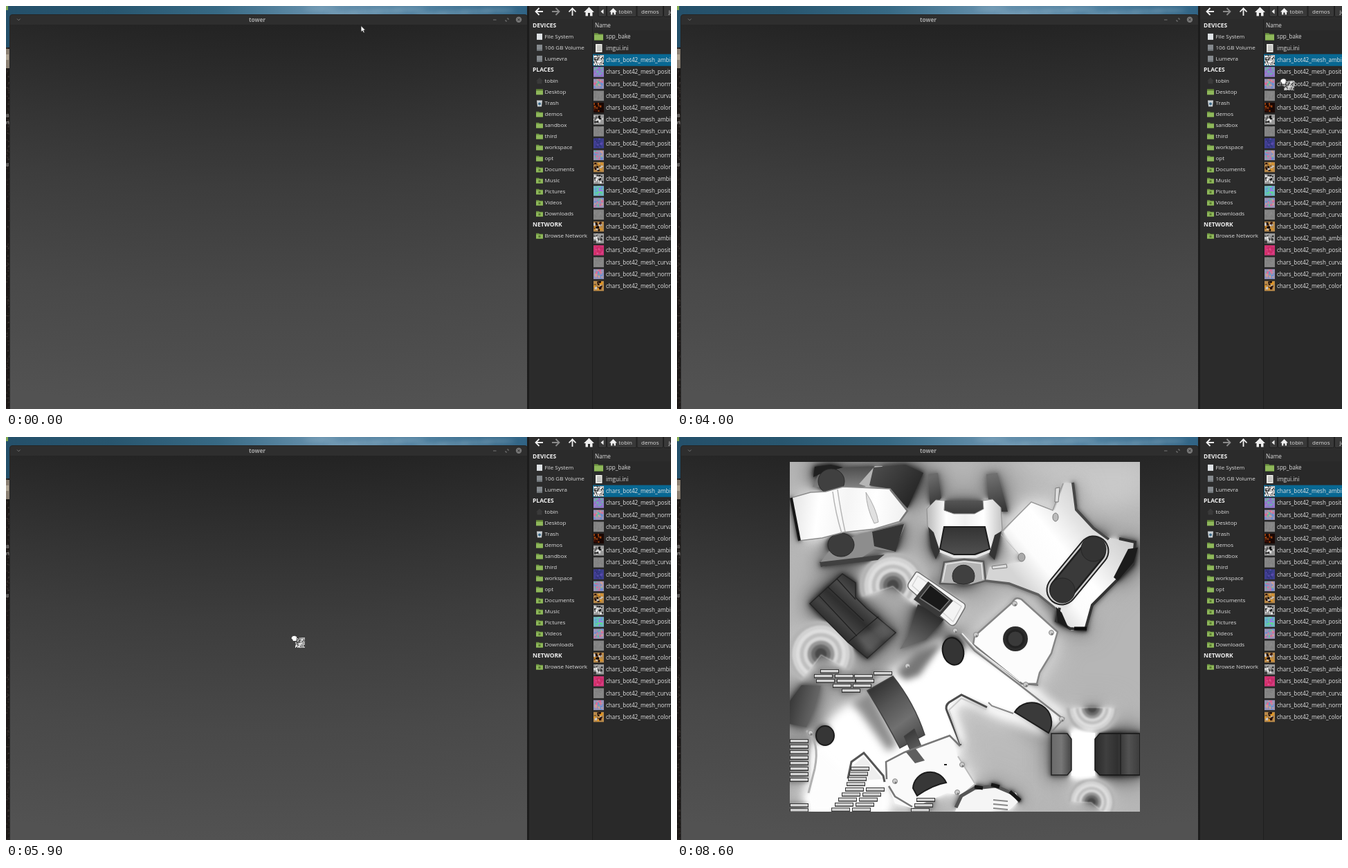
Recreate the animation shown at these times as an HTML page with a canvas. Size 961x583 px, loop 9000 ms.

```html
<!DOCTYPE html>
<html lang="en">
<head>
<meta charset="utf-8">
<title>tower</title>
<style>
html, body { margin: 0; width: 100%; height: 100%; overflow: hidden; background: #2b2b2b; }
canvas { display: block; }
</style>
</head>
<body>
<canvas id="stage" width="961" height="583"></canvas>
<script>
const W = 961, H = 583, LOOP = 9000;
const FONT = '"Open Sans", "Noto Sans", sans-serif';
const ctx = document.getElementById('stage').getContext('2d');

function layer(w, h) {
  const c = document.createElement('canvas');
  c.width = w;
  c.height = h;
  return c.getContext('2d');
}

function shape(g, d, fill, stroke, width = 1) {
  const p = new Path2D(d);
  if (fill) { g.fillStyle = fill; g.fill(p); }
  if (stroke) { g.strokeStyle = stroke; g.lineWidth = width; g.stroke(p); }
}

function box(g, x, y, w, h, fill) {
  g.fillStyle = fill;
  g.fillRect(x, y, w, h);
}

function oval(g, x, y, rx, ry, fill, stroke, width = 1, turn = 0) {
  g.beginPath();
  g.ellipse(x, y, rx, ry, turn, 0, 7);
  if (fill) { g.fillStyle = fill; g.fill(); }
  if (stroke) { g.strokeStyle = stroke; g.lineWidth = width; g.stroke(); }
}

function linear(g, x0, y0, x1, y1, ...colors) {
  const grad = g.createLinearGradient(x0, y0, x1, y1);
  colors.forEach((c, i) => grad.addColorStop(i / (colors.length - 1), c));
  return grad;
}

function text(g, s, x, y, size = 8, color = '#dedede', weight = 400) {
  g.font = `${weight} ${size}px ${FONT}`;
  g.fillStyle = color;
  g.fillText(s, x, y + 2.9);
}

function random(seed) {
  return () => {
    seed = (seed * 16807 + 11) % 2147483647;
    return seed / 2147483647;
  };
}

function softShape(g, blur, d, fill) {
  g.filter = `blur(${blur}px)`;
  shape(g, d, fill);
  g.filter = 'none';
}

// Islands of the baked map, in stage coordinates
function drawIslands() {
  const g = layer(506, 506);
  g.translate(-163, -36);
  const put = (d, fill, stroke, w) => shape(g, d, fill, stroke, w);
  const soft = (blur, d, fill) => softShape(g, blur, d, fill);

  // Turned discs
  const disc = (x, y, a, b, size = 1) => {
    g.filter = 'blur(1.3px)';
    ['#b4b4b4', '#d2d2d2', '#dedede', '#c0c0c0', '#d8d8d8', '#979797', '#6a6a6a', '#484848'].forEach((c, i) => {
      g.beginPath();
      g.arc(x, y, (47 - i * 5.5) * size, a, b);
      g.lineTo(x, y);
      g.fillStyle = c;
      g.fill();
    });
    g.filter = 'none';
  };
  disc(312, 215, 2.8, 7);
  disc(208, 314, 2.2, 6.8);

  // Main body
  soft(9, 'M245 400L300 350 385 300 445 325 500 358 560 405 530 425 450 390 410 374 390 392 410 445 310 480 300 545H190L205 430Z', '#fff');
  soft(7, 'M350 340L385 300 440 325 505 362 490 385 410 375 390 390 405 440 350 430Z', '#fff');
  soft(5, 'M200 445L245 490 270 460 300 500V542H190Z', '#fdfdfd');
  soft(5, 'M318 340L348 312 385 296 350 345 330 352Z', '#777');
  soft(6, 'M255 385L280 365 318 445 305 455Z', '#8c8c8c');

  // Hull
  put('M196 72L205 52 240 44 290 42 272 72 245 76Z', linear(g, 0, 42, 0, 76, '#4c4c4c', '#858585'));
  put('M197 58L199 43 222 40 240 44 208 53Z', '#202020');
  oval(g, 223, 64, 19, 18, '#404040', '#2a2a2a');
  put('M263 68L286 42 297 42 278 73Z', '#b5b5b5');
  put('M284 44L330 40 356 52 333 103 308 75 278 70Z', linear(g, 285, 45, 345, 90, '#4b4b4b', '#252525'));
  put('M206 183L225 158 265 140 330 126 314 166 285 162 265 176 210 188Z', '#8d8d8d');
  put('M282 137L328 126 316 166 285 158Z', '#363636');
  oval(g, 237, 156, 19, 17, '#3c3c3c', '#262626');
  put('M206 181L300 170 290 178 208 188Z', '#404040');
  put('M165 88L193 80 215 79 240 72 308 75 333 106 322 122 285 133 240 138 210 146 177 150Z',
    linear(g, 165, 90, 325, 110, '#e4e4e4', '#fff', '#f5f5f5', '#fff', '#f2f2f2'), '#8a8a8a', 1.5);
  put('M165 88L177 150', null, '#161616', 4);
  put('M232 76Q236 105 243 137M225 79Q229 110 238 139', null, '#b5b5b5', 1.5);
  put('M273 80Q288 103 291 123L285 125Q274 103 273 80Z', '#e0e0e0', '#aaa');
  put('M308 76L333 107 322 122', null, '#777', 2.5);

  // Yoke
  put('M363 54L377 52 382 88 366 106Z', linear(g, 363, 60, 380, 95, '#6a6a6a', '#383838'));
  put('M447 54L463 52 478 108 466 108 450 90Z', linear(g, 455, 55, 470, 105, '#707070', '#383838'));
  put('M386 92H442L447 123H381Z', linear(g, 0, 92, 0, 123, '#555', '#2a2a2a'));
  put('M361 104L374 91 387 92 386 106 400 111H430L443 104 442 92 456 90 468 102 470 133 458 166 448 166 445 130H387L381 166 371 162 362 128Z',
    linear(g, 362, 0, 470, 0, '#bbb', '#fff', '#f0f0f0', '#fff', '#c4c4c4'), '#888');
  put('M386 130H445L452 162 430 170H400L380 162Z', linear(g, 0, 130, 0, 170, '#333', '#505050'), '#1c1c1c', 2);
  put('M380 165L400 173H432L452 165', null, '#e6e6e6', 4);
  put('M363 130L371 138 380 165 374 177 367 160ZM469 136L459 142 451 170 459 178Z', '#343434');

  // Small cap
  put('M380 212L386 181 415 177 443 180 446 208 425 214Z', '#b4b4b4', '#5a5a5a', 2.5);
  put('M384 209L389 184 415 180 440 183 442 206', null, '#e5e5e5', 1.5);
  put('M400 209A16 16 0 1 1 428 209Q414 217 400 209Z', '#404040', '#2a2a2a');

  // Wing plate
  put('M472 137L512 93 546 106 560 66 573 67 579 106 602 131 625 146 661 152 659 180 633 208 602 240 592 278 570 280 548 250 522 226 480 211 446 207 452 188 500 180 492 166Z',
    linear(g, 480, 190, 600, 90, '#d5d5d5', '#fcfcfc', '#fff', '#e4e4e4', '#cfcfcf'));
  soft(3, 'M590 145L625 160 560 250 535 220Z', '#dadada');
  put('M572 66L577 105 602 132 624 148', null, '#474747', 4);
  put('M470 136L512 94 543 106 558 67', null, '#999', 1.5);
  put('M446 208L480 212 522 228 553 253', null, '#5f5f5f', 3.5);
  put('M639 147L662 152 659 184 632 211 600 243 590 279 568 277 548 266 553 247', null, '#333', 4);
  put('M548 246L556 254 566 277 550 268ZM652 162L666 160 660 181 637 208 631 203Z', '#1c1c1c');
  put('M574 277L592 277', null, '#0c0c0c', 5);
  put('M455 187L476 184 477 189 456 191ZM547 74L553 73 551 94 546 94Z', '#ddd', '#777');
  put('M468 141L498 174', null, '#bbb', 1);
  oval(g, 547, 116, 4, 6, '#bbb', '#777');
  oval(g, 498, 174, 5, 6, '#aaa', '#777');

  // Slot
  g.lineCap = 'round';
  [[45, '#222'], [41, '#cfcfcf'], [36, '#1f1f1f'], [31, '#3a3a3a']].forEach(([w, c]) =>
    put('M602 165L556 221', null, c, w));
  g.lineCap = 'butt';
  oval(g, 602, 162, 18, 18, '#343434', '#252525');
  oval(g, 557, 222, 18, 18, '#343434', '#252525');

  // Dark crate
  put('M192 241L239 198 258 211 258 232 274 248 316 283 275 320 247 297Z',
    linear(g, 225, 280, 275, 225, '#2a2a2a', '#434343', '#2e2e2e', '#4a4a4a', '#303030'), '#242424', 1.5);
  put('M205 229L260 288M218 217L270 266M231 205L258 235M247 297L291 260', null, '#202020', 1.2);
  soft(4, 'M262 290L298 268 312 283 275 315Z', 'rgba(125,125,125,.45)');

  // Tablet
  put('M348 242L386 264 360 293 322 307 334 287Z', linear(g, 365, 250, 330, 303, '#2c2c2c', '#707070'));
  put('M345 196Q347 194 352 198L415 241Q418 244 415 249L403 270Q399 275 394 271L336 220Q332 216 335 211Z', '#f4f4f4', '#707070', 1.5);
  put('M348 201L411 245 399 267 340 215Z', null, '#d5d5d5', 1.5);
  put('M363 209L399 237 378 261 342 235Z', '#393939');
  put('M366 214L394 236 380 252 351 233Z', '#191919', '#777', 1.5);

  // Diamond plate
  put('M485 239Q489 230 498 235L550 282 541 313 524 341 520 357 498 357 428 300 430 288Z', '#fcfcfc', '#858585', 2.5);
  put('M427 300L499 357 522 359', null, '#777', 2);
  oval(g, 489, 292, 18, 18, '#2c2c2c');
  oval(g, 489, 292, 12, 12, '#3a3a3a', '#222', 3);
  oval(g, 399, 310, 15, 20, '#343434', '#161616', 2, -.25);
  put('M409 285L430 309 493 357 557 407', null, '#808080', 2.5);
  put('M412 284L432 306 496 354', null, '#f5f5f5', 1.5);

  // Half dome and outlines
  put('M488 398A26 26 0 0 1 537 428Z', '#3a3a3a', '#1c1c1c', 2);
  put('M560 406L541 427M486 400L455 389 450 384', null, '#888', 2);
  put('M410 446L390 396Q387 389 393 384L411 373 448 391', null, '#4c4c4c', 3);
  put('M410 444L393 395 411 378 447 394', null, '#ccc', 2);

  // Strips
  put('M275 367L312 346Q343 385 358 431L322 450Q302 411 275 367Z',
    linear(g, 285, 360, 345, 440, '#333', '#555', '#707070', '#4a4a4a'), '#444', 1.5);
  put('M328 433L343 422 360 465 345 471Z', linear(g, 330, 430, 355, 470, '#3a3a3a', '#777'), '#444');
  put('M163 382L180 359 208 360 198 393 187 420 163 415Z', linear(g, 165, 380, 205, 390, '#3a3a3a', '#6c6c6c'));
  oval(g, 214, 432, 13, 14, '#363636', '#1c1c1c', 2);
  put('M187 425Q207 440 199 480L190 515', null, '#b0b0b0', 3);
  put('M248 497L256 474 270 462 297 495Z', '#eee');
  put('M247 494L252 470 270 457 298 490 300 499', null, '#555', 3);

  // Lower plate
  put('M303 500L302 470 329 456 395 432 405 461 431 501 410 518 390 515 340 537 315 530Z', '#fafafa');
  put('M303 495L302 470 329 456 394 432 409 447M306 505L315 520 340 535', null, '#777', 2.5);
  put('M406 462L431 502 413 517', null, '#bbb', 2);
  put('M341 508A25 25 0 0 1 389 500Q370 503 347 519Z', '#373737', '#1c1c1c', 2);
  put('M331 456L345 451 358 468 344 472Z', '#5f5f5f');
  box(g, 386, 473, 4, 2, '#222');
  put('M402 542L410 518 430 506 460 503 490 515 495 526 480 540Z', '#f5f5f5');
  put('M403 536L411 519 430 508 460 505 486 516 496 528', null, '#555', 5);
  put('M430 506L442 508M454 503L466 506M481 513L496 526', null, '#161616', 5);

  // Fixings along the edges
  ['402,280', '432,286', '541,283', '488,241', '504,358', '556,408', '412,474', '315,498', '333,331', '405,514', '193,428'].forEach(s => {
    const [x, y] = s.split(',').map(Number);
    oval(g, x, y, 3.5, 3.5, '#ccc', '#888');
    oval(g, x + 1, y + 2, 1.5, 1.5, '#777');
  });

  // Slats
  const slats = (y, ...xs) => xs.forEach(x => {
    box(g, x, y, 27, 6, '#363636');
    box(g, x + 1, y + 1, 25, 3.5, '#d4d4d4');
  });
  slats(336, 207);
  slats(339, 284);
  slats(343, 198, 228, 256);
  slats(350, 201, 231, 258);
  slats(357, 225, 254);
  slats(364, 238);
  for (let i = 0; i < 8; i++) slats(437 + i * 8, 163);
  slats(530, 163);
  slats(537, 163);
  for (let i = 0; i < 4; i++) slats(477 + i * 7.4, 251 - i * 2);
  for (let i = 0; i < 5; i++) slats(507 + i * 7.3, 243 - i * 5, 273 - i * 5);
  slats(522, 346);
  slats(530, 343);
  slats(537, 338);
  for (let i = 0; i < 3; i++) put(`M457 ${525 + i * 6}l21 2`, null, '#888', 2);

  // Cross
  disc(600, 392, 0, Math.PI, .78);
  disc(599, 528, Math.PI, 7, .72);
  soft(4, 'M570 424H604V492H570Z', '#fff');
  box(g, 570, 428, 34, 62, '#fff');
  put('M541 429H564L570 437V482L564 489H541Z', linear(g, 541, 0, 570, 0, '#6a6a6a', '#777', '#444'), '#222', 1.5);
  put('M611 429H669V489H611L604 482V437Z', linear(g, 604, 0, 669, 0, '#2a2a2a', '#3f3f3f', '#303030', '#525252', '#3c3c3c'), '#161616', 1.5);
  put('M641 429V489', null, '#202020', 1.5);
  return g.canvas;
}

// Gutters take the blurred tone of the nearest islands
function drawMap() {
  const g = layer(506, 506), islands = drawIslands();
  box(g, 0, 0, 506, 506, '#b6b6b6');
  softShape(g, 16, 'M307 -6H517V54L447 74 377 24Z', '#c9c9c9');
  softShape(g, 12, 'M260 365L325 370 377 405V490H340L300 455 262 455Z', '#bbb');
  for (const blur of [20, 10, 5, 2.5]) {
    g.filter = `blur(${blur}px)`;
    g.drawImage(islands, 0, 0);
  }
  g.filter = 'blur(.5px)';
  g.drawImage(islands, 0, 0);
  return g.canvas;
}

const map = drawMap();

const HUES = {
  ambi: ['#999', '#111', '#eee', '#ddd', '#333', '#777'],
  curva: ['#858585', '#808080', '#8a8a8a'],
  posit: ['#8f7fc8', '#a05bd0', '#6fb0a8', '#8b7fd8', '#b08ac0'],
  norm: ['#9a93b8', '#d96a9a', '#5cc0a0', '#d0a090', '#6a8fd0'],
  color: ['#b98a4a', '#e6971e', '#2a0c08', '#ccc', '#150808'],
  ember: ['#1a0805', '#3a0d06', '#a2450f', '#160706'],
  indigo: ['#3f3f90', '#33337c', '#5a4cae', '#2c3f80'],
  mint: ['#6fb8c0', '#4fd89a', '#9a7ce8', '#5c9ce0', '#77d08a'],
  pink: ['#d03478', '#c72a68', '#e24f90', '#d82e5c']
};

function thumb(g, x, y, kind, seed) {
  const rnd = random(seed * 7919 + 37), colors = HUES[kind];
  box(g, x, y, 15, 14.5, colors[0]);
  for (let i = 0; i < 34; i++) {
    const c = colors[Math.floor(rnd() * colors.length)];
    box(g, x + rnd() * 11.5, y + rnd() * 11, 1.5 + rnd() * 2, 1.5 + rnd() * 2, c);
  }
}

function folder(g, x, y, s = 1) {
  shape(g, `M${x} ${y + s}h${4 * s}l${s} ${s}h${5 * s}v${7 * s}h${-10 * s}z`, '#6d9440');
  box(g, x, y + 3 * s, 10 * s, 5.5 * s, '#8fb85b');
}

function drawDesktop(g) {
  box(g, 0, 0, 760, 60, linear(g, 0, 0, 760, 0, '#24506a', '#28566f', '#376984', '#6791ad', '#4f7f9e', '#2f6283'));
  g.save();
  g.beginPath();
  g.rect(0, 0, 755, 13);
  g.clip();
  g.filter = 'blur(3px)';
  for (let i = 0; i < 9; i++)
    oval(g, 455 + i * 32, 4 + (i * 7) % 9, 24, 2.5, 'rgba(160,190,208,.4)');
  g.restore();
  box(g, 0, 60, 6, 523, '#1d1918');
  const rnd = random(5);
  for (let i = 0; i < 260; i++) {
    const y = 60 + rnd() * 523, v = 20 + rnd() * 34;
    box(g, rnd() * 5, y, 2, 2, `rgb(${v + 6},${v},${v - 3})`);
  }
  box(g, 0, 62, 5, 28, '#8a7f72');
  box(g, 0, 70, 4, 8, '#b0a695');
  box(g, 0, 0, 3, 6, '#86ad52');
  text(g, 'il', 0, 158, 8, '#ddd');
  text(g, 'n', 0, 168, 8, '#ddd');
  text(g, 'il', 0, 229, 8, '#ddd');
}

function drawTower(g) {
  shape(g, 'M5 583V17Q5 12 10 12H749Q754 12 754 17V583Z', '#252525');
  const sky = g.createRadialGradient(380, -1800, 1827, 380, -1800, 2385);
  ['#232323', '#2c2c2c', '#353535', '#3d3d3d', '#434343', '#494949', '#4d4d4d', '#525252']
    .forEach((c, i) => sky.addColorStop(i / 7, c));
  box(g, 6, 27, 747, 556, sky);
  box(g, 753, 0, 3, 583, '#1c1c1c');
}

function drawSidebar(g) {
  const rows = ['DEVICES', 'File System', '106 GB Volume', 'Lumevra', 'PLACES', 'tobin', 'Desktop', 'Trash',
    'demos', 'sandbox', 'third', 'workspace', 'opt', 'Documents', 'Music', 'Pictures', 'Videos', 'Downloads',
    'NETWORK', 'Browse Network'];
  rows.forEach((s, i) => {
    const y = 28.4 + i * 16;
    if (s === s.toUpperCase()) return text(g, s, 761, y, 8.5, '#f0f0f0', 700);
    text(g, s, 778.5, y);
    if (i === 1) {
      box(g, 767, y - 4.5, 8, 9, '#dfe3e6');
    } else if (i < 4) {
      box(g, 767, y - 4.5, 8, 9, '#858a8e');
      box(g, 767, y + 2.5, 8, 2, '#6d7276');
    } else if (i === 5) {
      shape(g, `M766 ${y}l5 -5 5 5h-1.5v4h-7v-4z`, '#3a3a3a');
    } else if (i === 6) {
      box(g, 766, y - 4, 10, 8, '#8fb85b');
      box(g, 766, y - 4, 10, 2, '#58792f');
    } else if (i === 7) {
      shape(g, `M767 ${y - 4}h8l-1 9h-6z`, '#c9d0d4');
      oval(g, 771, y + 1, 2, 2, '#3d6a88');
    } else {
      folder(g, 766, y - 4.6);
      if (i > 12) box(g, 769.5, y - .5, 3, 3, '#58792f');
    }
  });
}

function drawToolbar(g) {
  shape(g, 'M776 8H766M770.5 3L765.5 8 770.5 13', null, '#f0f0f0', 1.8);
  shape(g, 'M789 8H799M794.5 3L799.5 8 794.5 13', null, '#8a8a8a', 1.8);
  shape(g, 'M818.5 14V4M813.5 8.5L818.5 3.3 823.5 8.5', null, '#f0f0f0', 1.8);
  shape(g, 'M835 9L842.5 1.5 850 9H847.5V14.5H844V10H841V14.5H837.5V9Z', '#f0f0f0');
  const crumb = (x, w) => {
    g.beginPath();
    g.roundRect(x, -3, w, 18.5, 2);
    g.fillStyle = '#393939';
    g.fill();
    g.strokeStyle = '#202020';
    g.lineWidth = 1;
    g.stroke();
  };
  crumb(856, 11.5);
  crumb(868.5, 42.5);
  crumb(912, 37.5);
  crumb(950.5, 20);
  shape(g, 'M863.5 4.5V11.5L859.5 8Z', '#eee');
  shape(g, 'M872 8.5L877.5 3 883 8.5H881V12.5H878.7V9.5H876.3V12.5H874V8.5Z', '#f0f0f0');
  text(g, 'tobin', 885.5, 8.2);
  text(g, 'demos', 918, 8.2);
  text(g, 'jam', 957.5, 8.2);
}

const KINDS = ['ambi', 'posit', 'norm', 'curva', 'ember', 'ambi', 'curva', 'indigo', 'norm', 'color',
  'ambi', 'mint', 'norm', 'curva', 'color', 'ambi', 'pink', 'curva', 'norm', 'color'];
const LABEL = { ambi: 'ambient', posit: 'position', indigo: 'position', mint: 'position', pink: 'position',
  norm: 'normal', curva: 'curvature', color: 'color', ember: 'color' };

function drawRow(g, i) {
  const y = 78.2 + i * 17.2, kind = KINDS[i];
  if (i) thumb(g, 849, y - 7.2, kind, i + 3);
  else g.drawImage(map, 849, y - 7.2, 15, 14.5);
  text(g, `chars_bot42_mesh_${LABEL[kind]}`, 867, y, 8.15, '#e4e4e4');
}

function drawFiles(g) {
  box(g, 756, 0, 205, 583, '#2b2b2b');
  box(g, 756, 0, 205, 19, '#2d2d2d');
  box(g, 847, 19, 1, 564, '#1f1f1f');
  box(g, 848, 19, 113, 564, '#292929');
  box(g, 848, 19, 113, 16, '#2c2c2c');
  drawToolbar(g);
  drawSidebar(g);
  text(g, 'Name', 851, 28.2, 8.15);
  folder(g, 850, 38, 1.3);
  text(g, 'spp_bake', 867, 43.8, 8.15);
  box(g, 852, 55, 9.5, 12, '#e9e9e4');
  for (let i = 0; i < 4; i++) box(g, 854, 57.5 + i * 2.2, 6, .8, '#888');
  text(g, 'imgui.ini', 867, 61, 8.15);
  for (let i = 1; i < KINDS.length; i++) drawRow(g, i);
}

const back = layer(W, H);
drawDesktop(back);
drawTower(back);
drawFiles(back);

function drawTitle(focused) {
  const c = focused ? '#e2e2e2' : '#a6a6a6', dim = focused ? '#bbb' : '#777';
  shape(ctx, 'M6 27V17Q6 13 10 13H749Q753 13 753 17V27Z', '#2e2e2e');
  ctx.textAlign = 'center';
  text(ctx, 'tower', 363, 20.2, 8.2, c, 700);
  ctx.textAlign = 'left';
  shape(ctx, 'M16 18.5L18.3 20.8 20.6 18.5M704 20H708.5', null, dim, 1);
  shape(ctx, 'M724 18H726V20M722 20V22H724', null, dim, 1);
  oval(ctx, 741, 19.7, 4.2, 4.2, dim);
  shape(ctx, 'M739.4 18.1L742.6 21.3M742.6 18.1L739.4 21.3', null, '#2e2e2e', 1);
}

function arrow(x, y) {
  ctx.save();
  ctx.translate(x, y);
  shape(ctx, 'M.5 .5V9.6L2.6 7.7 4.2 11 5.8 10.3 4.3 7.1H7Z', '#fff', '#222', .8);
  ctx.restore();
}

function drag(x, y) {
  ctx.globalAlpha = .85;
  ctx.drawImage(map, x + 6, y + 3.5, 14.5, 14.5);
  ctx.globalAlpha = 1;
  ctx.save();
  ctx.translate(x, y);
  shape(ctx, 'M1 3Q1 1.5 2.5 2 3 .4 4.5 1 6 .2 7 1.4 9 1.2 9 3V5.5L8 9H3L2.4 6.8 .6 5Z', '#fff', '#222', .8);
  ctx.restore();
}

const mix = (a, b, u) => a + (b - a) * u;
const progress = (t, a, b) => Math.min(1, Math.max(0, (t - a) / (b - a)));
const sine = u => (1 - Math.cos(Math.PI * u)) / 2;
const gentle = u => (u + sine(u)) / 2;

function drawPointer(t) {
  if (t < 2000) {
    const u = sine(progress(t, 0, 900));
    arrow(mix(512.5, 900, u), mix(28, 76, u));
  } else if (t < 6500) {
    const lift = progress(t, 1900, 2400), a = progress(t, 3900, 4900), b = progress(t, 4900, 5900);
    if (t < 4000) drag(mix(898, 889, lift), mix(73, 101, lift));
    else if (t < 5000) drag(mix(889, 603.5, gentle(a)), mix(101, 231, sine(a)));
    else drag(mix(603.5, 411.5, gentle(b)), mix(231, 286.5, gentle(b)));
  } else if (t < 8200) {
    const u = progress(t, 7600, 8100) ** 1.4, nudge = t < 6700 ? 0 : .6;
    arrow(mix(415.5 + nudge, 123, u), mix(288 + nudge, 21, u));
  }
}

function draw(now) {
  const t = Math.floor((now % LOOP) / 100) * 100;
  ctx.drawImage(back.canvas, 0, 0);
  drawTitle(t >= 6900 && t < 8600);
  box(ctx, 848, 69.6, 113, 17.2, t >= 900 && t < 1500 ? '#127cb0' : '#086893');
  drawRow(ctx, 0);
  if (t >= 6500) ctx.drawImage(map, 163, 36);
  drawPointer(t);
}

let start;
function tick(now) {
  start ??= now;
  draw(now - start);
  requestAnimationFrame(tick);
}
draw(0);
requestAnimationFrame(tick);
</script>
</body>
</html>
```
